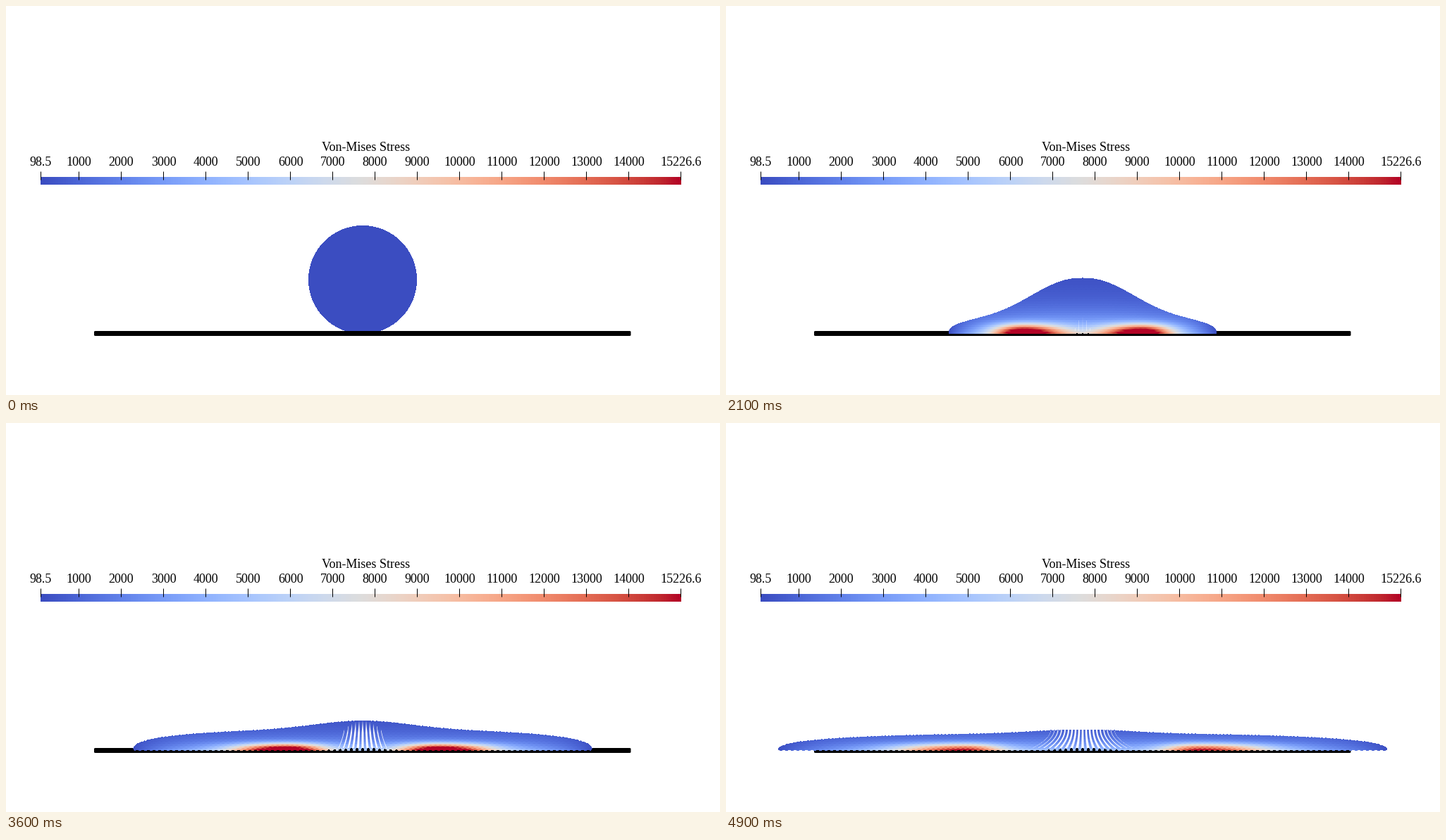
A matplotlib script for the animation above (5 s loop, 1013 px wide and 553 px high).

```python
import numpy as np
import matplotlib.pyplot as plt
from matplotlib.animation import FuncAnimation
from matplotlib.patches import FancyBboxPatch

W, H, DPI = 1013, 553, 64
FRAMES, STEP = 50, 100
VMIN, VMAX = 98.5, 15226.6
CX, TOP, RADIUS = 506, 312, 77
FLOOR = 462
CMAP = plt.get_cmap("coolwarm")

X0, X1, Y0, Y1 = 60, 952, 305, 470
gx, gy = np.meshgrid(np.arange(X0, X1) + .5 - CX, np.arange(Y0, Y1) + .5)
dist = np.abs(gx)


def ramp(t, a, b):
    return np.clip((t - a) / (b - a), 0, 1)


def smooth(t, a, b):
    u = ramp(t, a, b)
    return u * u * (3 - 2 * u)


def keyed(t, *points):
    return np.interp(t, *zip(*points))


def outline(t):
    """Crown position, floor contact, front and height profile at time t."""
    fall = t ** 2.3
    top = TOP + 138 * fall / (fall + 4.7)
    base = FLOOR + 4.3 * ramp(t, 1.6, 2)
    front = max(-22.3 + 107.4 * t - 2.95 * t * t, 1)

    # a flat slab runs outwards under a bell-shaped crown
    flat = smooth(t, 1.4, 2.5)
    slab = flat * (47 - 4.4 * t)
    rim = np.clip(1 - (dist / front) ** 2.5, 0, 1) ** .35
    bell = np.exp(-(dist / min(.66 * front, 92)) ** (2.8 - .8 * flat))
    height = slab * rim + (base - top - slab) * bell
    return top, base, front, height


def stress(t, up, tall, front, loose):
    """Two hot spots on a soft layer along the floor, scaled to 0..1."""
    amp = keyed(t, (0, 0), (.8, .12), (1.6, .95), (2.5, .8), (4.4, 1.1),
                (4.9, .7))
    pos = keyed(t, (.8, 50), (1.6, 66), (2.5, 100), (4.4, 115), (4.9, 168))
    soft = keyed(t, (0, 0), (1.6, .6), (2.5, .38), (4.9, .33))
    reach = max(15, min(.27 * tall, 22 * t))
    depth = max(10, .165 * tall)

    side = np.where(dist < pos, 52, max(.21 * front, 20))
    hot = amp * np.exp(-((dist - pos) / side) ** 2
                       - (np.maximum(up, 0) / depth) ** 2.5)
    fade = 1 - (dist / max(front, 110)) ** (2 + 2 * ramp(t, 1.6, 2.5))
    v = hot + soft * np.clip(fade, 0, 1) * np.exp(-np.maximum(up, 0) / reach)
    grain = .05 * np.sin(1.9 * gy)
    grain = grain + .12 * loose * np.sin(2 * np.pi * gx / 7) * np.sin(1.3 * gy)
    return v * (1 + grain)


def body(t):
    """RGBA picture of the collapsing disc at time t in seconds."""
    top, base, front, height = outline(t)
    loose = .5 * ramp(t, 1.8, 3.3)
    up = base - gy

    # silhouette with the beaded rim of separate material points
    bead = .8 * loose * (1 - np.cos(2 * np.pi * gx / 5))
    spread = (up < height - bead) & (dist < front - np.clip(5 - up, 0, 5) * loose)
    disc_part = np.hypot(gx, gy - top - RADIUS) < RADIUS
    lump = np.clip(np.cos(2 * np.pi * gx / 8) + .4, 0, 1)
    rise = loose * lump * (3 + 6 * np.exp(-(gx / 35) ** 2))
    alpha = ((spread | (disc_part & (gy > top + bead))) & (up > rise)) * 1.0

    # strands fanning out below the crown
    d = np.clip((gy - top) / (base - top), 0, 1)
    lane = gx / (1 + .25 * max(t - 1.8, 0) * d * d)
    start = min(.7, .7 - .58 * (t - 2.4))
    span = 14 + 13.5 * max(t - 2.5, 0)
    width = loose * (ramp(d, start, start + .4) - (lane / span) ** 2)
    tear = width / 2 - np.abs(lane / 5 - np.round(lane / 5))
    gap = np.clip(.5 + 5 * tear, 0, 1) * ((up > 4) & (width > 0))

    v = stress(t, up, base - top, front, loose)
    rgba = CMAP(np.clip(v + .004, 0, 1))
    rgba[..., 3] = alpha * (1 - gap)
    return rgba


fig = plt.figure(figsize=(W / DPI, H / DPI), dpi=DPI, facecolor="white")
ax = fig.add_axes([0, 0, 1, 1])
ax.axis("off")


def label(x, y, text):
    ax.text(x, y, text, family="Liberation Serif", fontsize=18 * 72 / DPI,
            ha="center", va="baseline", color="black")


def draw_scale():
    left, right = 48.76, 956.76
    ax.imshow(np.linspace(0, 1, 256)[None], cmap=CMAP, aspect="auto",
              interpolation="nearest", extent=(49, 958, 254, 243))
    label(510.5, 206, "Von-Mises Stress")
    for value in [VMIN, *range(1000, 15000, 1000), VMAX]:
        x = left + (value - VMIN) / (VMAX - VMIN) * (right - left)
        ax.plot([x, x], [235, 247], color="black", lw=72 / DPI,
                solid_capstyle="butt")
        label(x + .6, 227, f"{value:g}")


draw_scale()
ax.add_patch(FancyBboxPatch((125, FLOOR), 761.5, 7, fc="black", ec="none",
                            boxstyle="round,pad=0,rounding_size=1.5"))
disc = ax.imshow(body(0), extent=(X0, X1, Y1, Y0), aspect="auto",
                 interpolation="nearest", zorder=5)
ax.set_xlim(0, W)
ax.set_ylim(H, 0)


def update(i):
    disc.set_data(body(i * STEP / 1000))
    return [disc]


anim = FuncAnimation(fig, update, frames=FRAMES, interval=STEP, repeat=True,
                     repeat_delay=0, blit=False)
plt.show()
```
